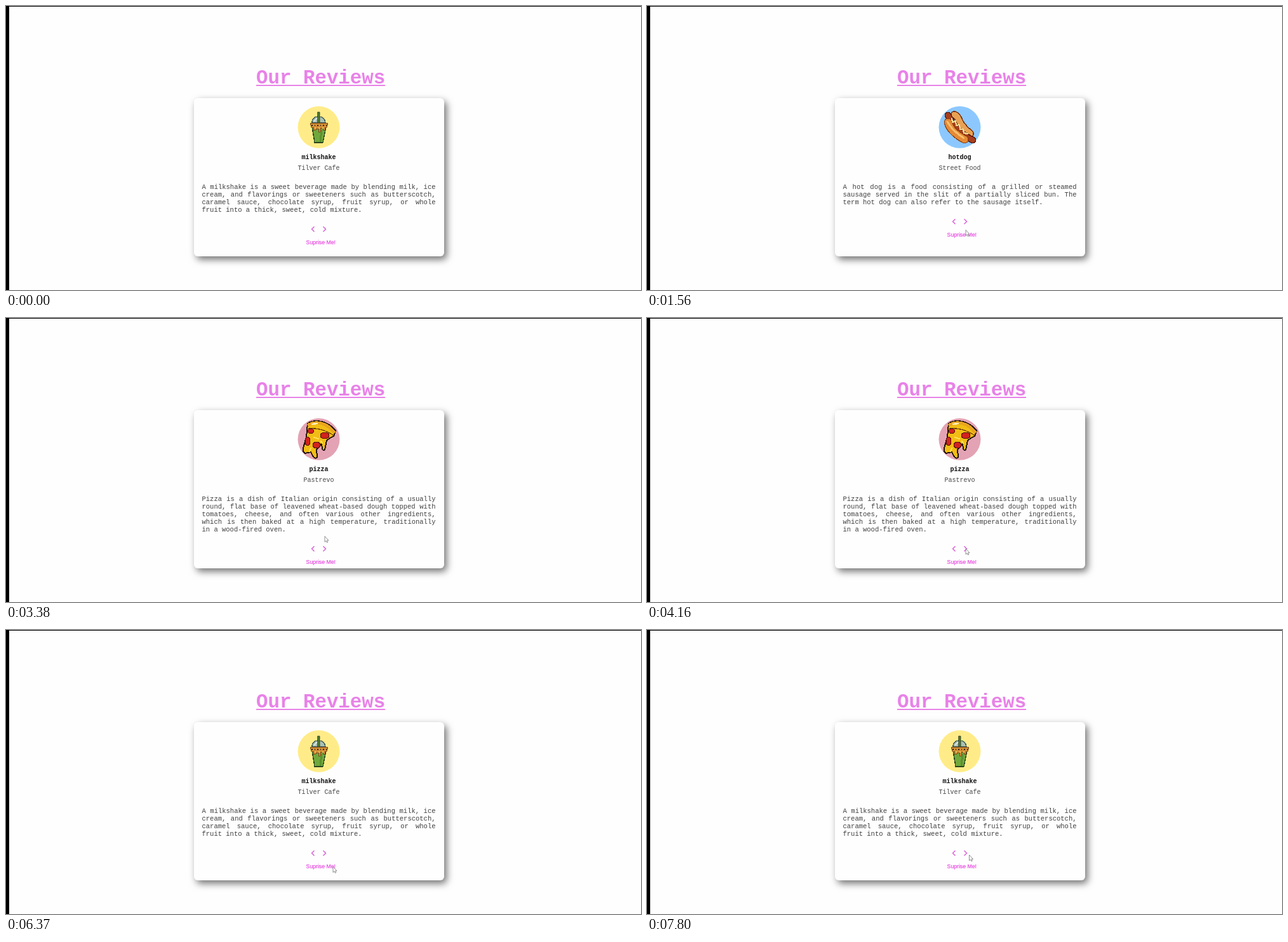
Recreate the animation shown at these times as an HTML page. Size 1000 by 447 pixels, loop 8 s.

```html
<!DOCTYPE html>
<html lang="en">
<head>
<meta charset="utf-8">
<title>Our Reviews</title>
<style>
  html, body { margin: 0; width: 100%; height: 100%; overflow: hidden; background: #fefefe; }
  body { position: relative; }
  .card {
    position: absolute; left: 296px; top: 145px; width: 394px; height: 249px;
    border-radius: 6px; background: #fefefe;
    box-shadow: 4px 5px 12px rgba(0, 0, 0, .55);
  }
  svg { position: absolute; left: 0; top: 0; }
  .mono, .review { font-family: "Liberation Mono", monospace; }
  .title { font-size: 30.8px; font-weight: bold; fill: #e882e8; }
  .name, .place { font-size: 10px; text-anchor: middle; }
  .name { font-weight: bold; fill: #111; }
  .place { fill: #484848; }
  .review {
    position: absolute; left: 308.5px; top: 279px; width: 368px;
    font-size: 10.5px; line-height: 12px; color: #404040;
  }
  .review div { white-space: nowrap; text-align-last: justify; }
  .review div:last-child { text-align-last: left; }
  .surprise { font: 8.7px "Liberation Sans", sans-serif; fill: #e640df; stroke: #e640df; stroke-width: .15; }
  .arrows { fill: none; stroke: #d95cd6; stroke-width: 1.4; }
  .art { shape-rendering: crispEdges; stroke-linejoin: round; stroke-linecap: round; }
</style>
</head>
<body>
<div class="card"></div>
<svg width="1000" height="447" viewBox="0 0 1000 447">
  <path d="M0 0H1000V1H5V447H0Z"/>
  <text class="mono title" x="394" y="122">Our Reviews</text>
  <path d="M394 124h203v2h-203z" fill="#e882e8"/>
  <circle id="disc" cx="492.5" cy="190.8" r="33"/>
  <g class="art" id="milkshake">
    <path d="M482 184Q482 174 492 174T503 184Z" fill="#a9bfb5" stroke="#3f5a50" stroke-width="1.3"/>
    <path d="M486 181q2-4 5-4" fill="none" stroke="#e6eee8" stroke-width="1.5"/>
    <path d="M491 167h3v17h-3z" fill="#4f7a33" stroke="#26381c" stroke-width=".8"/>
    <path d="M482 190H504L499 215H486Z" fill="#70a83c" stroke="#29451d" stroke-width="1.4"/>
    <path d="M497 196l-2 17" stroke="#5b9132" stroke-width="3"/>
    <path d="M479 184H507L505 191H502V195H499V192H495V198H492V193H488V195H484V191H481Z" fill="#d18f34" stroke="#7d4a1a"/>
    <path d="M481 187.5H506" stroke="#3b210f" stroke-width="2" stroke-dasharray="1.5 3" stroke-linecap="butt"/>
    <path d="M486 191.5H503" stroke="#f1c55f" stroke-width="2" stroke-dasharray="2 4" stroke-linecap="butt"/>
  </g>
  <g class="art" id="hotdog" fill="none">
    <path d="M484 171Q489 173 492 181T509 201" stroke="#7a3210" stroke-width="12"/>
    <path d="M484 171Q489 173 492 181T509 201" stroke="#e9a253" stroke-width="9"/>
    <path d="M474 172Q479 184 490 195T513 211" stroke="#54180e" stroke-width="11"/>
    <path d="M474 172Q479 184 490 195T513 211" stroke="#a7401c" stroke-width="8"/>
    <path d="M474 183Q478 198 500 210" stroke="#8a3d12" stroke-width="13"/>
    <path d="M474 183Q478 198 500 210" stroke="#e58a35" stroke-width="10.5"/>
    <path d="M473 182Q480 196 499 208" stroke="#f6bd6c" stroke-width="3"/>
    <path d="M480 177l1 6 5-2 1 7 5-1 1 7 5 0 1 6 6 1" stroke="#f8dc94" stroke-width="2.2"/>
  </g>
  <g class="art" id="pizza">
    <path d="M475 166Q484 160 497 163T519 177L516 186Q509 189 505 193L502 207Q499 210 498 205L497 198 489 207 490 219Q487 223 483 217L480 211 471 213Q467 211 468 205L473 187Z"
          fill="#f2bd14" stroke="#24160b" stroke-width="2"/>
    <path d="M477 168Q486 163 497 166T516 179" fill="none" stroke="#e9a51f" stroke-width="5"/>
    <path d="M482 167l8-1" stroke="#fff0b8" stroke-width="2.5"/>
    <path d="M476 174Q497 172 516 185" fill="none" stroke="#6b3b0c" stroke-width="1.2"/>
    <g fill="#d3221d" stroke="#56120d">
      <ellipse cx="480" cy="178" rx="5" ry="4"/>
      <ellipse cx="502" cy="185" rx="7" ry="5"/>
      <ellipse cx="475" cy="194" rx="4" ry="7"/>
      <ellipse cx="489" cy="200" rx="6" ry="5"/>
    </g>
    <path d="M485 188l7 2M480 205l-2 5M496 194l2 3" stroke="#ffe158" stroke-width="2"/>
  </g>
  <text class="mono name" id="name" x="492.5" y="241"></text>
  <text class="mono place" id="place" x="492.5" y="257.5"></text>
  <g id="controls">
    <path class="arrows" d="M485.5-4L481.5 0 485.5 4M499.5-4L503.5 0 499.5 4"/>
    <text class="surprise" x="472.6" y="23.5">Suprise Me!</text>
  </g>
</svg>
<div class="review" id="review"></div>
<svg width="1000" height="447" viewBox="0 0 1000 447">
  <path id="cursor" d="M0 0V9L2 7.2 3.4 10 4.8 9.3 3.5 6.6H6Z" fill="#fff" stroke="#777" stroke-width=".8"/>
</svg>
<script>
const LOOP = 8000;
const $ = id => document.getElementById(id);

const items = {
  milkshake: {
    place: 'Tilver Cafe', color: '#ffec88',
    lines: ['A milkshake is a sweet beverage made by blending milk, ice',
      'cream, and flavorings or sweeteners such as butterscotch,',
      'caramel sauce, chocolate syrup, fruit syrup, or whole',
      'fruit into a thick, sweet, cold mixture.']
  },
  hotdog: {
    place: 'Street Food', color: '#8cc8ff',
    lines: ['A hot dog is a food consisting of a grilled or steamed',
      'sausage served in the slit of a partially sliced bun. The',
      'term hot dog can also refer to the sausage itself.']
  },
  pizza: {
    place: 'Pastrevo', color: '#e3a3b4',
    lines: ['Pizza is a dish of Italian origin consisting of a usually',
      'round, flat base of leavened wheat-based dough topped with',
      'tomatoes, cheese, and often various other ingredients,',
      'which is then baked at a high temperature, traditionally',
      'in a wood-fired oven.']
  }
};

// [time, item]
const clicks = [[0, 'milkshake'], [1430, 'hotdog'], [3380, 'pizza'],
  [4810, 'milkshake'], [6630, 'hotdog'], [7800, 'milkshake']];

// [time, x, y] of the pointer tip
const pointer = [[0, 540, 460], [260, 538, 440], [390, 530, 418], [520, 520, 394],
  [650, 510, 372], [780, 504, 358], [910, 502, 352.5],
  [2080, 502, 350], [2210, 502, 346], [2340, 502, 343.5],
  [3900, 502, 349], [4030, 502, 357], [4160, 502, 363], [4290, 502, 366],
  [4940, 502, 373.5], [6240, 509, 373], [6370, 515, 372.5],
  [7410, 514, 368], [7540, 511, 361], [7670, 508, 355], [7800, 507.5, 354]];

const stepAt = (steps, t) => steps.findLast(step => step[0] <= t);

let shown;
function show(key) {
  if (key === shown) return;
  shown = key;
  const { place, color, lines } = items[key];
  for (const id in items) $(id).style.display = id === key ? '' : 'none';
  $('disc').setAttribute('fill', color);
  $('name').textContent = key;
  $('place').textContent = place;
  $('review').innerHTML = lines.map(line => `<div>${line}</div>`).join('');
  $('controls').setAttribute('transform', `translate(0 ${303.3 + 12 * lines.length})`);
}

function frame() {
  const t = performance.now() % LOOP;
  show(stepAt(clicks, t)[1]);
  const [, x, y] = stepAt(pointer, t);
  $('cursor').setAttribute('transform', `translate(${x} ${y})`);
  requestAnimationFrame(frame);
}
frame();
</script>
</body>
</html>
```
